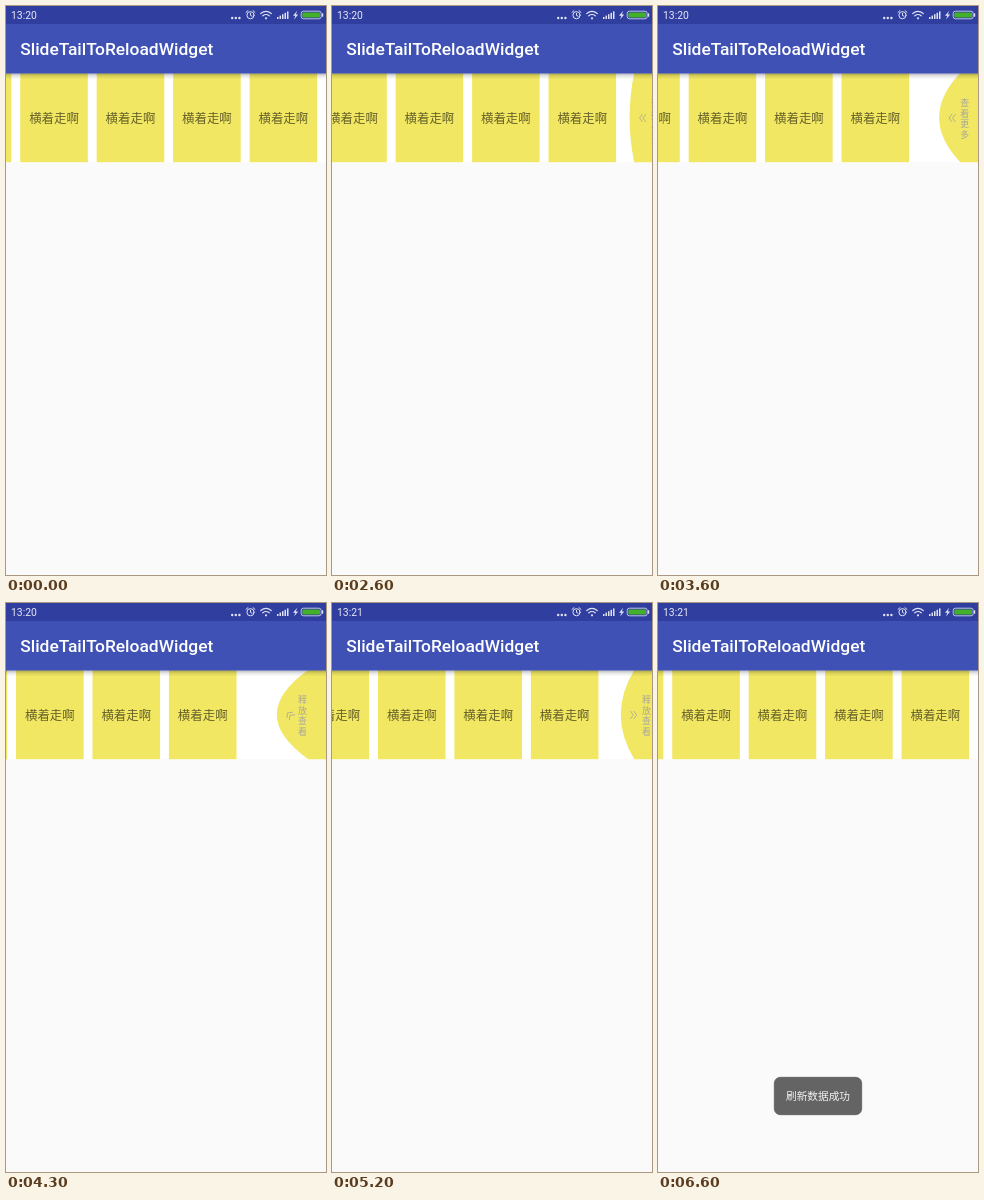
An HTML page for the animation above (6.7 s loop, 320 px wide and 569 px high).

```html
<!DOCTYPE html>
<html lang="zh-CN">
<head>
<meta charset="utf-8">
<title>Pull left</title>
<style>
  html, body { margin: 0; width: 100%; height: 100%; overflow: hidden; background: #fafafa; }
  svg { display: block; width: 100vw; height: 100vh; }
  text { font-family: "Noto Sans CJK SC", "Noto Sans CJK", "Noto Sans SC", sans-serif; }
  .latin { font-family: Roboto, sans-serif; }
  .card { font-size: 12.44px; fill: #000; fill-opacity: .58; text-anchor: middle; }
  .hint { font-size: 8.9px; fill: #a8a69c; text-anchor: middle; }
  .toast { font-size: 10.67px; fill: #f2f2f2; text-anchor: middle; }
  .line { fill: none; stroke: #dfe2f3; stroke-linecap: round; }
</style>
</head>
<body>
<svg viewBox="0 0 320 569" preserveAspectRatio="none">
  <defs>
    <linearGradient id="shade" x2="0" y2="1">
      <stop offset="0" stop-color="#000" stop-opacity=".26"/>
      <stop offset=".45" stop-color="#000" stop-opacity=".09"/>
      <stop offset="1" stop-color="#000" stop-opacity="0"/>
    </linearGradient>
  </defs>

  <rect width="320" height="569" fill="#fafafa"/>
  <rect y="67" width="320" height="89.2" fill="#fff"/>
  <g id="cards"></g>
  <path id="bulge" fill="#f1e762"/>
  <g id="more">
    <g id="arrow" fill="none" stroke="#a8a69c" stroke-width=".8">
      <path d="M0 -4L-3 0L0 4M3.4 -4L.4 0L3.4 4"/>
    </g>
    <g id="hint"></g>
  </g>

  <rect y="67.6" width="320" height="6" fill="url(#shade)"/>
  <rect y="17" width="320" height="50.6" fill="#3f51b5"/>
  <rect width="320" height="18" fill="#303f9f"/>
  <text class="latin" x="14.2" y="49.2" font-size="17.4" font-weight="500" fill="#fff">SlideTailToReloadWidget</text>

  <text id="clock" class="latin" x="5" y="12.8" font-size="10.4" fill="#e6e8f6"></text>
  <g fill="#dfe2f3">
    <circle cx="226.2" cy="12" r="1.2"/>
    <circle cx="229.8" cy="12" r="1.2"/>
    <circle cx="233.4" cy="12" r="1.2"/>
    <circle cx="260" cy="12.3" r="1.1"/>
    <path d="M291.2 4.8L287 9.8H289.4L288 13.4L292.2 8.4H289.8Z"/>
    <rect x="315.8" y="7.2" width="1.4" height="3.6" rx=".6"/>
    <g id="bars"></g>
  </g>
  <g class="line">
    <circle cx="244.5" cy="9.2" r="3.6"/>
    <path d="M244.5 7.2V9.4L246 10.2M240 6.4L242 4.6M249 6.4L247 4.6"/>
    <path d="M254.8 7.5Q260 3.2 265.2 7.5M256.8 9.8Q260 7.2 263.2 9.8" stroke-width="1.2"/>
  </g>
  <rect x="295.2" y="5.2" width="20" height="7.6" rx="2.2" fill="#303f9f" stroke="#dfe2f3" stroke-width=".8"/>
  <rect x="296.4" y="6.4" width="17.6" height="5.2" rx="1.2" fill="#43b02a"/>

  <g id="toast">
    <rect x="116.3" y="474.3" width="87.4" height="37.4" rx="6" fill="#646464" stroke="#555" stroke-width=".7"/>
    <text class="toast" x="160" y="497">刷新数据成功</text>
  </g>
</svg>
<script>
  const LOOP = 6700, RELEASE = 5000, RETURN = 700, ARMED = 4200;
  const PEEK = 17.8; // strip that slides in before the edge starts to bend
  const el = id => document.getElementById(id);
  const clamp = v => Math.min(1, Math.max(0, v));

  // piecewise linear curve through [x, y] points
  const curve = points => x => {
    if (x <= points[0][0]) return points[0][1];
    for (let i = 1; i < points.length; i++) {
      const [x0, y0] = points[i - 1], [x1, y1] = points[i];
      if (x <= x1) return y0 + (y1 - y0) * (x - x0) / (x1 - x0);
    }
    return points[points.length - 1][1];
  };

  const drag = curve([[1800, 0], [2600, 27], [3600, 60], [4300, 80.6], [4600, 88]]);

  const pull = t => t < RELEASE ? drag(t)
    : drag(RELEASE) * (1 - clamp((t - RELEASE) / RETURN)) ** 2;

  el("cards").innerHTML = [0, 1, 2, 3, 4].map(i => {
    const x = -62.2 + i * 76.44;
    return `<rect x="${x}" y="67" width="67.56" height="89.2" fill="#f1e762"/>
      <text class="card" x="${x + 33.8}" y="116.6">横着走啊</text>`;
  }).join("");

  el("bars").innerHTML = [0, 1, 2, 3, 4].map(i =>
    `<rect x="${271 + i * 2.5}" y="${11 - i * 1.4}" width="1.5" height="${2 + i * 1.4}"/>`).join("");

  let shown = "";
  function setHint(word) {
    if (word === shown) return;
    shown = word;
    el("hint").innerHTML = [...word].map((c, i) =>
      `<text class="hint" x="12.6" y="${100.4 + i * 10.4}">${c}</text>`).join("");
  }

  function draw(t) {
    const s = pull(t), peek = Math.min(s, PEEK);
    const edge = 320 - peek, bend = (s - peek) / 2;
    el("cards").setAttribute("transform", `translate(${-s} 0)`);
    el("bulge").setAttribute("d",
      `M340 67H${edge}Q${edge - 2 * bend} 111.6 ${edge} 156.2H340Z`);
    el("more").setAttribute("transform", `translate(${edge - bend + 13} 0)`);
    const turn = 180 * clamp((t - ARMED - 50) / 200);
    el("arrow").setAttribute("transform", `translate(0 112) rotate(${turn})`);
    setHint(t < ARMED ? "查看更多" : "释放查看");
    el("clock").textContent = t < 4600 ? "13:20" : "13:21";

    const rise = 1 - (1 - clamp((t - 6100) / 400)) ** 2;
    el("toast").setAttribute("transform", `translate(0 ${24 * (1 - rise)})`);
    el("toast").setAttribute("opacity", rise);
  }

  const start = performance.now();
  function tick() {
    draw((performance.now() - start) % LOOP);
    requestAnimationFrame(tick);
  }
  tick();
</script>
</body>
</html>
```
